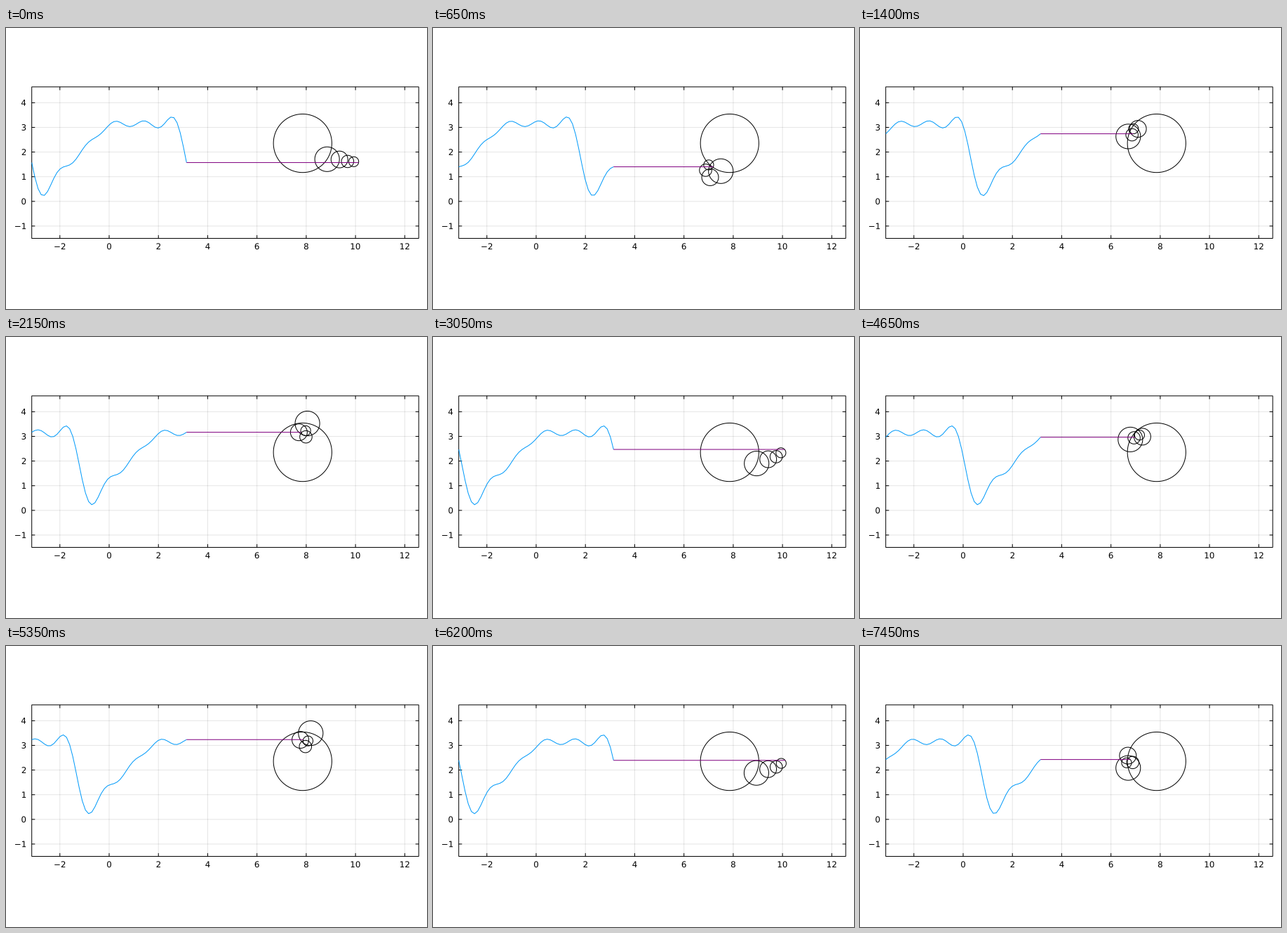
Write a matplotlib script that moves like this. It is 600 px wide and 400 px high and loops after 7.5 s.

```python
import numpy as np
import matplotlib.pyplot as plt
from matplotlib.animation import FuncAnimation
from matplotlib.patches import PathPatch
from matplotlib.textpath import TextPath
from matplotlib.transforms import Affine2D

W, H, DPI = 600, 400, 100
PX = 72 / DPI                        # one pixel in points
SCALE, X0, Y0 = 35.11, 147.0, 246.8  # pixels per unit, pixel position of the origin
LEFT, RIGHT = -np.pi, 4 * np.pi
BOTTOM, TOP = -1.5, np.pi + 1.5
FRAMES, STEP, START = 150, 0.1, 0.01
TICK = 4.6 / SCALE
FONT = 11.85 / SCALE
CAP = 8.64 / SCALE                   # height of a digit

plt.rcParams["font.family"] = "DejaVu Sans"

# Fourier series of f(x) = pi + min(x, 0) on [-pi, pi]
n = np.arange(1, 6)
a = (1 - (-1.0) ** n) / (np.pi * n**2)
b = -((-1.0) ** n) / n
radii = np.hypot(a, b)
center = (2.5 * np.pi, 0.75 * np.pi)


def series(x):
    nx = np.outer(x, n)
    return center[1] + np.cos(nx) @ a + np.sin(nx) @ b


def joints(t):
    """Centers of the circles, followed by the tip of the last one."""
    s, c = np.sin(n * t), np.cos(n * t)
    xs = center[0] + np.r_[0, np.cumsum(a * s - b * c)]
    ys = center[1] + np.r_[0, np.cumsum(a * c + b * s)]
    return xs, ys


# The axes span the whole stage, in plot units
fig = plt.figure(figsize=(W / DPI, H / DPI), dpi=DPI, facecolor="white")
ax = fig.add_axes([0, 0, 1, 1])
ax.set_xlim(-X0 / SCALE, (W - X0) / SCALE)
ax.set_ylim((Y0 - H) / SCALE, Y0 / SCALE)
ax.axis("off")


def line(xs=(), ys=(), color="black", **style):
    return ax.plot(xs, ys, color=color, lw=PX, snap=False,
                   solid_capstyle="butt", solid_joinstyle="miter", **style)[0]


def label(value, x, y, align):
    """Place the ink so that x is at the given share of its width."""
    path = TextPath((0, 0), str(value).replace("-", "\u2212"), size=FONT)
    box = path.get_extents()
    move = Affine2D().translate(x - box.x0 - align * box.width, y)
    ax.add_patch(PathPatch(move.transform_path(path), fc="black", lw=0,
                           snap=False))


for v in range(-2, 13, 2):
    line([v, v], [BOTTOM, TOP], alpha=0.1)
    line([v, v], [BOTTOM, BOTTOM + TICK])
    line([v, v], [TOP, TOP - TICK])
    label(v, v, (Y0 - 315.1) / SCALE, 0.5)
for v in range(-1, 5):
    line([LEFT, RIGHT], [v, v], alpha=0.1)
    line([LEFT, LEFT + TICK], [v, v])
    line([RIGHT, RIGHT - TICK], [v, v])
    label(v, (28.2 - X0) / SCALE, v - CAP / 2, 1)
ax.add_patch(plt.Rectangle((LEFT, BOTTOM), RIGHT - LEFT, TOP - BOTTOM,
                           fill=False, ec="black", lw=PX, snap=False))

grid = np.linspace(-np.pi, np.pi, 50)
ring = np.linspace(0, 2 * np.pi, 200)
curve = line(color="#009AFA")
circles = [line() for _ in n]
link = line(color="purple")


def draw(i):
    shift = START + STEP * i
    xs, ys = joints(np.pi + shift)
    curve.set_data(grid, series(grid + shift))
    for circle, r, x, y in zip(circles, radii, xs, ys):
        circle.set_data(x + r * np.cos(ring), y + r * np.sin(ring))
    link.set_data([np.pi, xs[-1]], [ys[-1], ys[-1]])
    return [curve, *circles, link]


anim = FuncAnimation(fig, draw, frames=FRAMES, interval=50, repeat=True,
                     repeat_delay=0, blit=False)
plt.show()
```
